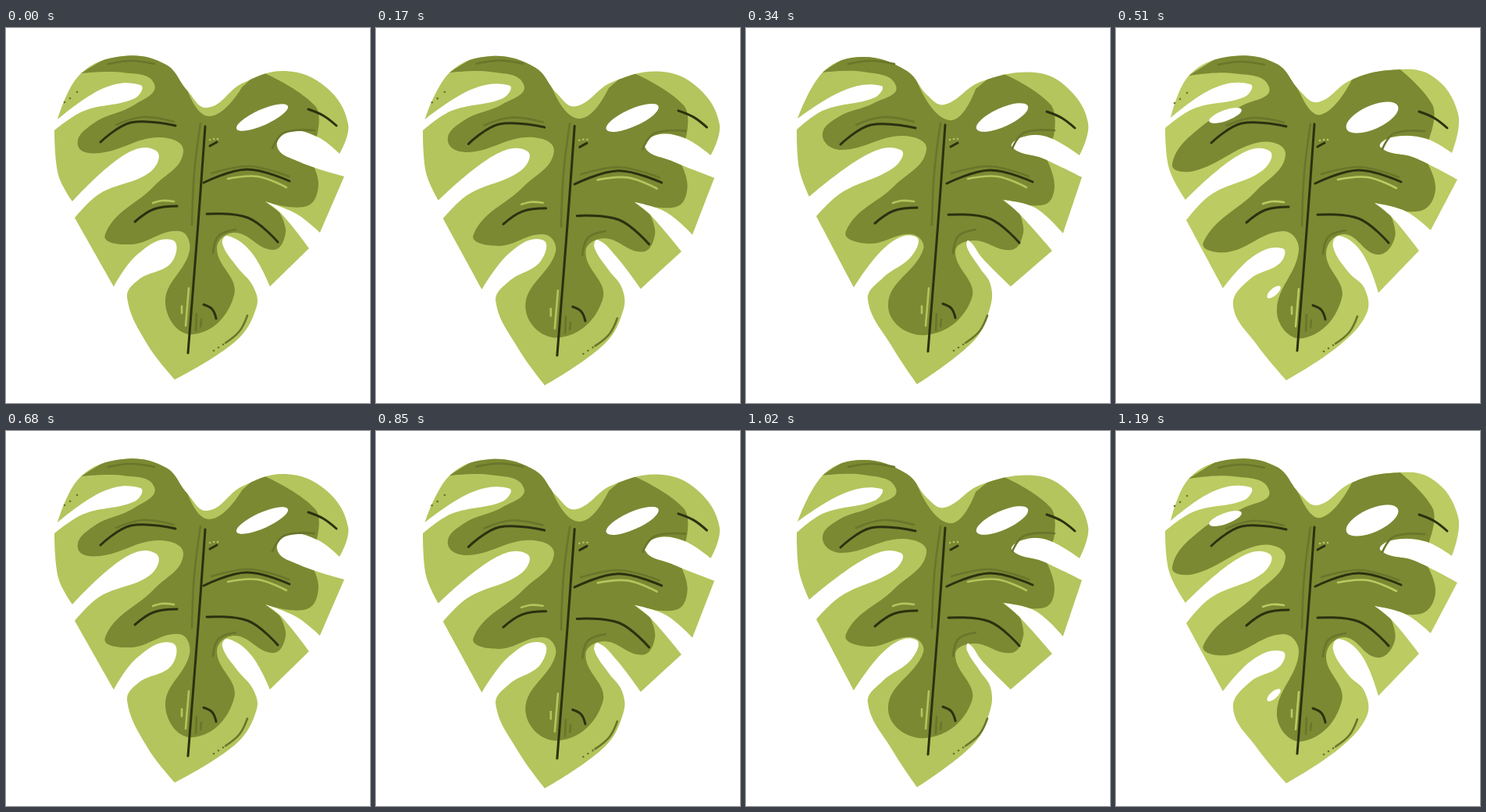
Animation of 466 by 480 pixels, one loop 1360 ms. Source, as an HTML page with a canvas:

```html
<!DOCTYPE html>
<html lang="en">
<head>
<meta charset="utf-8">
<title>Monstera leaf</title>
<style>
  html, body { margin: 0; width: 100%; height: 100%; overflow: hidden; background: #fff; }
  canvas { display: block; }
</style>
</head>
<body>
<canvas id="stage" width="466" height="480"></canvas>
<script>
const ctx = document.getElementById('stage').getContext('2d');
const HOLD = 170;
const DARK = '#7b8933', INK = '#2b310f', SHADE = '#69762a', LIGHT = '#b4c55d', PALE = '#bccb62';

// "x,y" is a smooth point, "x,y*" a sharp corner.
function points(text) {
  return text.trim().split(/\s+/).map(word => {
    const [x, y] = word.split(',').map(parseFloat);
    return { x, y, sharp: word.endsWith('*') };
  });
}

const calmEdge = points(`258,102 302,71 358,55 410,76 438,123 427,161* 400,140 365,132 347,151 372,170
  433,190* 402,262* 372,238 332,222* 352,237 388,282* 338,331* 314,287 284,266 277,276 296,306
  316,330 321,356 295,400 216,450* 181,405 155,345 170,322 212,300 212,271 168,290
  138,331* 88,243* 120,212 185,184 192,157 152,162 85,222* 67,188 62,131* 100,106 165,90 172,73 125,77
  66,117* 95,59 150,36 205,47 232,80`);
const narrowEdge = points(`254,98 300,69 370,57 412,77 438,122 427,163* 385,139 352,140 341,153 380,167
  430,191* 406,263* 370,230 330,220* 352,240 392,285* 339,331* 302,294 285,272 283,281 300,308
  313,328 313,356 292,400 219,456* 187,408 156,348 175,320 212,292 217,267 180,279
  138,332* 90,241* 122,211 190,178 198,156 155,162 81,216* 68,180 65,130* 100,105 165,89 173,74 125,80
  66,116* 100,55 150,37 206,55 232,86`);
const spreadEdge = points(`258,95 300,67 350,54 404,61 438,110 430,160* 395,141 352,140 339,153 382,166
  437,194* 403,259* 370,234 331,224* 354,243 388,285* 336,339* 315,288 286,266 278,280 298,313
  318,333 321,365 285,407 218,451* 180,405 150,355 172,321 210,301 213,282 176,292
  137,333* 90,246* 122,213 188,182 196,157 155,164 89,220* 68,180 63,128* 100,103 165,88 172,72 125,77
  70,115* 95,59 150,36 206,46 235,80`);

const calmDark = points(`96,58* 150,57 190,72 165,98 112,122 92,150 120,160 195,140 227,158 190,202
  127,264 160,277 222,260 235,285 204,352 240,392 292,342 270,282 293,262 342,284 358,262 350,236*
  332,222* 385,228 400,200 388,165* 398,138* 396,100 325,55* 302,76* 260,113 231,76* 190,0*`);
const narrowDark = points(`97,57* 150,56 192,74 164,96 118,114 98,138 122,156 200,138 231,156 190,202
  128,260 158,276 212,264 227,283 182,356 230,393 289,346 268,286 292,272 340,284 355,262 350,236*
  328,220* 382,226 395,202 384,166* 394,138* 390,98 322,55* 294,78* 260,118 218,66* 185,0*`);
const spreadDark = points(`93,61* 150,58 196,76 162,99 112,124 72,174 100,183 185,146 217,162 180,208
  112,274 142,287 214,260 234,284 206,364 240,397 289,346 269,288 292,264 335,290 357,268 350,236*
  332,225* 390,234 409,206 395,166* 402,138* 405,98 350,42* 302,66* 262,111 236,84* 190,0*`);

const lines = text => text.split(';').map(points);
const inkLines = lines(`255,126 246,250 233,416; 121,146 160,121 217,125; 165,248 189,232 219,228;
  253,198 308,181 363,196; 257,238 310,243 348,274; 387,104 406,112 423,125; 261,151 270,146;
  253,354 264,360 269,372`);
const shadeLines = lines(`131,46 160,42 190,46; 141,124 175,114 215,120; 249,122 241,185 238,252;
  263,186 312,177 362,190; 341,154 356,134 395,131; 265,288 272,266 294,258; 244,366 243,387;
  250,373 249,382; 309,368 299,388 281,403`);
const glintLines = lines('188,224 200,221 215,222; 284,193 322,190 359,204; 234,333 230,381; 225,356 225,365');
const specks = points('75,95 82,90 91,82');
const shadeDots = points('266,413 272,409 278,405');
const glintDots = points('261,143 266,142 271,142');

// How far each ink line moves in a pose.
const still = inkLines.map(() => ({ x: 0, y: 0 }));
const narrowShift = points('0,-2 0,3 0,2 4,1 2,1 -2,3 1,1 -1,-1');
const spreadShift = points('-1,-3 1,1 2,1 2,1 1,1 1,3 -3,1 -1,1');

const blend = (a, b) => a.map((p, i) => ({ ...p, x: (p.x + b[i].x) / 2, y: (p.y + b[i].y) / 2 }));

const calm = { edge: calmEdge, dark: calmDark, shift: still, detail: [0, 0], light: LIGHT, hole: 10, specks: true };
const narrow = { edge: narrowEdge, dark: narrowDark, shift: narrowShift, detail: [0, 0], light: LIGHT, hole: 12 };
const spread = { edge: spreadEdge, dark: spreadDark, shift: spreadShift, detail: [0, 1], light: PALE,
  hole: 15, specks: true, torn: true };
const between = { ...calm, edge: blend(calmEdge, narrowEdge), dark: blend(calmDark, narrowDark),
  shift: blend(still, narrowShift), hole: 11, grow: true };
const poses = [calm, between, narrow, spread];

// Smooth path whose handles follow the length of each segment.
function curve(list, closed) {
  const path = new Path2D();
  const n = list.length;
  const at = i => list[(i + n) % n];
  const handle = (i, reach) => {
    const p = at(i);
    if (p.sharp || (!closed && (i === 0 || i === n - 1))) return p;
    const a = at(i - 1), b = at(i + 1);
    const k = reach / Math.hypot(b.x - a.x, b.y - a.y);
    return { x: p.x + (b.x - a.x) * k, y: p.y + (b.y - a.y) * k };
  };
  path.moveTo(list[0].x, list[0].y);
  for (let i = 0; i < (closed ? n : n - 1); i++) {
    const p = at(i), q = at(i + 1);
    const reach = Math.hypot(q.x - p.x, q.y - p.y) * 0.37;
    const h = handle(i, reach), g = handle(i + 1, -reach);
    path.bezierCurveTo(h.x, h.y, g.x, g.y, q.x, q.y);
  }
  if (closed) path.closePath();
  return path;
}

function fill(list, color) {
  ctx.fillStyle = color;
  ctx.fill(curve(list, true));
}

function stroke(list, color, width) {
  ctx.strokeStyle = color;
  ctx.lineWidth = width;
  ctx.stroke(curve(list, false));
}

function ellipse(x, y, rx, ry, angle, color) {
  ctx.fillStyle = color;
  ctx.beginPath();
  ctx.ellipse(x, y, rx, ry, angle, 0, Math.PI * 2);
  ctx.fill();
}

const dots = (list, color) => list.forEach(p => ellipse(p.x, p.y, 1.3, 1.3, 0, color));

function drawLeaf(pose) {
  ctx.fillStyle = '#fff';
  ctx.fillRect(0, 0, 466, 480);
  ctx.save();
  if (pose.grow) {
    ctx.translate(58, 35);
    ctx.scale(1.014, 1.012);
    ctx.translate(-61.5, -35.5);
  }
  ctx.lineCap = ctx.lineJoin = 'round';
  fill(pose.edge, pose.light);
  ctx.save();
  ctx.clip(curve(pose.edge, true));
  fill(pose.dark, DARK);
  ctx.restore();

  ellipse(328, 114.5, 36, pose.hole, -0.42, '#fff');
  if (pose.torn) {
    ellipse(140, 112, 22, 7, -0.35, '#fff');
    ellipse(202, 338, 11, 4.5, -0.72, '#fff');
  }

  ctx.save();
  ctx.translate(...pose.detail);
  shadeLines.forEach(line => stroke(line, SHADE, 2.6));
  glintLines.forEach(line => stroke(line, pose.light, 2.6));
  if (pose.specks) dots(specks, SHADE);
  dots(shadeDots, SHADE);
  dots(glintDots, pose.light);
  ctx.restore();

  inkLines.forEach((line, i) => {
    ctx.save();
    ctx.translate(pose.shift[i].x, pose.shift[i].y);
    stroke(line, INK, 3);
    ctx.restore();
  });
  ctx.restore();
}

function tick(now) {
  drawLeaf(poses[Math.floor(now / HOLD) % poses.length]);
  requestAnimationFrame(tick);
}
requestAnimationFrame(tick);
</script>
</body>
</html>
```
